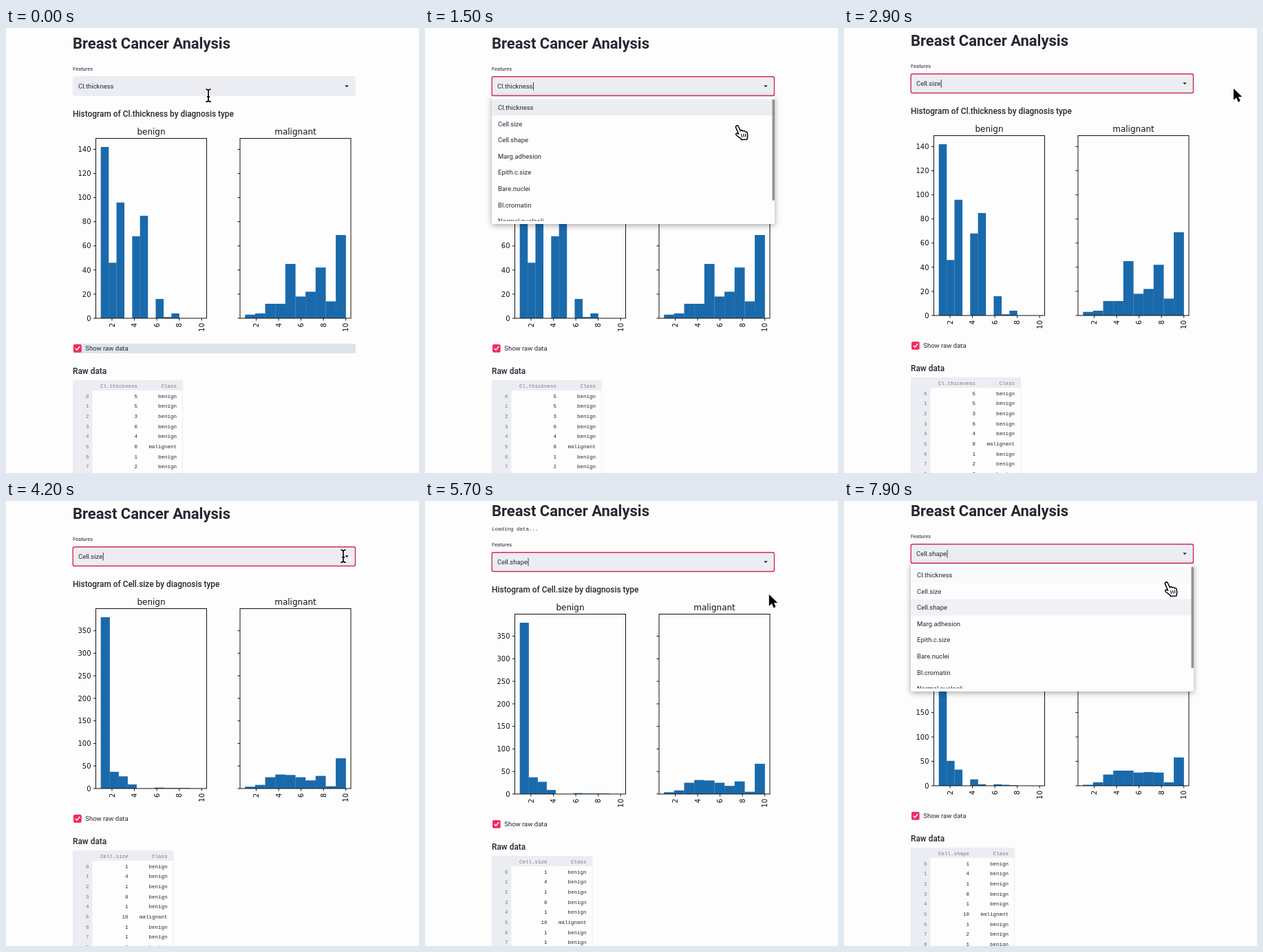
Animation of 600 by 647 pixels, one loop 8 s. Source, as an HTML page with a canvas:

```html
<!DOCTYPE html>
<html lang="en">
<head>
<meta charset="utf-8">
<title>Breast Cancer Analysis</title>
<style>
html, body { margin: 0; width: 100%; height: 100%; overflow: hidden; background: #fdfdfe; }
canvas { display: block; }
</style>
</head>
<body>
<canvas id="stage" width="600" height="647"></canvas>
<script>
const ctx = document.getElementById('stage').getContext('2d');
const LOOP = 8000, STEP = 100;
const INK = '#262730', PANEL = '#ecedf2', PAPER = '#fdfdfe', RED = '#d62a58', BLUE = '#1a6aab';
const UI = 'Roboto, sans-serif', MONO = '"Liberation Mono", monospace', PLOT = '"DejaVu Sans", sans-serif';

const options = ['Cl.thickness', 'Cell.size', 'Cell.shape', 'Marg.adhesion',
  'Epith.c.size', 'Bare.nuclei', 'Bl.cromatin', 'Normal.nucleoli'];

const features = [
  { rows: [5, 5, 3, 6, 4, 8, 1, 2, 2], tick: 20, maxX: 8,
    benign: [142, 46, 96, 0, 68, 85, 0, 16, 1, 4],
    malignant: [3, 4, 12, 12, 45, 18, 22, 42, 14, 69] },
  { rows: [1, 4, 1, 8, 1, 10, 1, 1, 1], tick: 50, maxX: 9,
    benign: [380, 37, 27, 9, 0, 0, 2, 1, 1, 1],
    malignant: [4, 8, 25, 31, 30, 25, 18, 28, 5, 67] },
  { rows: [1, 4, 1, 8, 1, 10, 1, 2, 1], tick: 50, maxX: 8,
    benign: [351, 51, 33, 0, 13, 3, 0, 3, 2, 1],
    malignant: [2, 7, 23, 31, 31, 27, 28, 27, 7, 58] }
];

// time, x, y, and the pointer shape used from then on
const pointer = [
  [0, 294, 98, 'beam'], [100, 286, 108, 'arrow'], [400, 84, 448, 'hand'], [600, 130, 430, 'arrow'],
  [900, 482, 125, 'beam'], [1000, 500, 87, 'beam'], [1200, 495, 92, 'hand'], [1500, 456, 142, 'hand'],
  [1900, 450, 141, 'arrow'], [2300, 437, 148, 'arrow'], [2700, 566, 88, 'arrow'], [3200, 566, 88, 'arrow'],
  [3400, 520, 72, 'beam'], [3600, 500, 72, 'beam'], [3900, 487, 78, 'beam'], [4100, 487, 78, 'beam'],
  [4200, 490, 80, 'beam'], [4500, 490, 80, 'hand'], [5000, 450, 148, 'hand'], [5200, 463, 166, 'hand'],
  [5400, 470, 165, 'arrow'], [5900, 516, 120, 'arrow'], [6200, 512, 96, 'hand'], [6400, 506, 85, 'hand'],
  [6600, 502, 78, 'hand'], [7200, 502, 78, 'hand'], [7400, 499, 78, 'hand'], [7900, 471, 118, 'hand']
];
const clicks = [[1000, 500, 87], [1800, 452, 140], [4300, 491, 77], [5100, 457, 161], [7300, 499, 77]];
const hovers = [[0, 0], [1200, 0], [1600, 1], [4500, 1], [4900, 2], [7400, 2], [7850, 0]];

const within = (t, ...spans) => spans.some(([a, b]) => t >= a && t < b);
const stage = (t, a, b) => (t >= a) + (t >= b);
const lastIndex = (list, t) => list.filter(k => k[0] <= t).length - 1;

function text(s, x, y, size, family = UI, { weight = 400, align = 'left', color = INK } = {}) {
  ctx.font = `${weight} ${size}px ${family}`;
  ctx.textAlign = align;
  ctx.fillStyle = color;
  ctx.fillText(s, x, y);
}

function box(x, y, w, h, color, r = 0) {
  ctx.fillStyle = color;
  ctx.beginPath();
  ctx.roundRect(x, y, w, h, r);
  ctx.fill();
}

function line(points, width = 1, color = INK) {
  ctx.strokeStyle = color;
  ctx.lineWidth = width;
  ctx.beginPath();
  points.forEach(([x, y]) => ctx.lineTo(x, y));
  ctx.stroke();
}

function plot(x, title, counts, maxX, top, tick, labelled) {
  const ink = '#111', base = 422, height = 261.5, unit = 16.28;
  const sy = height / (top * 1.05), bin = (maxX - 1) * unit / 10;
  text(title, x + 80.5, 155, 12, PLOT, { align: 'center', color: ink });
  counts.forEach((n, i) => n && box(x + 7.2 + i * bin, base - n * sy, bin + .15, n * sy, BLUE));
  ctx.strokeStyle = ink;
  ctx.lineWidth = 1;
  ctx.strokeRect(x, base - height, 161, height);
  for (let v = 0; v <= top * 1.05; v += tick) {
    const y = base - v * sy;
    line([[x - 3.5, y], [x, y]], 1, ink);
    if (labelled) text(v, x - 7, y + 3.7, 10, PLOT, { align: 'right', color: ink });
  }
  for (let v = 2; v <= 10; v += 2) {
    const tx = x + 7.2 + (v - 1) * unit;
    line([[tx, base], [tx, base + 3.5]], 1, ink);
    ctx.save();
    ctx.translate(tx + 3.7, base + 7);
    ctx.rotate(-Math.PI / 2);
    text(v, 0, 0, 10, PLOT, { align: 'right', color: ink });
    ctx.restore();
  }
}

function table(index) {
  const name = options[index], right = 137 + 4.5 * name.length;
  const cell = (s, x, y, color) => text(s, x, y, 7.5, MONO, { align: 'right', color });
  box(97, 512, right - 31.5, 15, PANEL);
  box(97, 512, 28.5, 200, PANEL);
  line([[right + 65.5, 512], [right + 65.5, 712]], 1, '#eeeef2');
  cell(name, right, 522.7, '#777983');
  cell('Class', right + 57, 522.7, '#777983');
  features[index].rows.forEach((v, i) => {
    const y = 537.5 + 14.7 * i;
    cell(i, 120.5, y, '#777983');
    cell(v, right, y);
    cell(i === 5 ? 'malignant' : 'benign', right + 57, y);
  });
}

function select(value, focused, caret) {
  box(97, 70, 411, 29, '#ecedf3', 3);
  if (focused) {
    ctx.strokeStyle = RED;
    ctx.lineWidth = 1.4;
    ctx.beginPath();
    ctx.roundRect(97.2, 70.7, 410.3, 27.8, 2.5);
    ctx.stroke();
  }
  text(value, 105, 88, 9.5);
  if (caret) {
    const x = 106 + ctx.measureText(value).width;
    line([[x, 79], [x, 90.5]], .9);
  }
  ctx.fillStyle = INK;
  ctx.fill(new Path2D('M492.3 83.3h5.4l-2.7 2.9z'));
}

function checkbox(focused) {
  if (focused) box(97, 459, 411, 14, '#dfe4eb', 2);
  box(98, 460, 11.7, 11.7, '#f02b5d', 2);
  line([[100.7, 465.8], [103, 468.2], [107.2, 463]], 1.5, '#fff');
  text('Show raw data', 115.3, 469, 9.5);
}

function dropdown(t) {
  ctx.save();
  ctx.shadowColor = 'rgba(0,0,0,.35)';
  ctx.shadowBlur = 9;
  ctx.shadowOffsetY = 2;
  box(97, 99.5, 411, 185.5, PAPER, 2);
  ctx.restore();
  ctx.save();
  ctx.beginPath();
  ctx.rect(97, 99, 411, 181.5);
  ctx.clip();
  const i = lastIndex(hovers, t), k = Math.min(1, (t - hovers[i][0]) / 200);
  [[hovers[Math.max(0, i - 1)][1], 1 - k], [hovers[i][1], k]].forEach(([row, alpha]) => {
    ctx.globalAlpha = alpha;
    box(97, 103.7 + 23.6 * row, 408, 23.6, PANEL);
  });
  ctx.globalAlpha = 1;
  options.forEach((s, n) => text(s, 106, 119 + 23.6 * n, 9.5));
  ctx.restore();
  box(504.5, 103.5, 3.5, 147.5, '#929295', 1.7);
}

function expandIcon() {
  line([[516.5, 147.2], [516.5, 144.5], [519.2, 144.5]], 1.1);
  line([[516.5, 144.5], [519, 147]], 1.1);
  line([[523.2, 148.6], [523.2, 151.3], [520.5, 151.3]], 1.1);
  line([[523.2, 151.3], [520.7, 148.8]], 1.1);
}

const arrowPath = new Path2D('M0 0V16.8L4 13.2 6.7 19.4 9.7 18.1 7.1 12.1H12.3Z');
const beamPath = new Path2D('M-3.6-8.8Q-.6-8.8 0-6.8Q.6-8.8 3.6-8.8M0-7V8M-3.6 9.2Q-.6 9.2 0 7.2Q.6 9.2 3.6 9.2M-2 1.8H2');
const handPath = new Path2D('M-4.6 2.4C-5-.3-1.4-1 -.6 1.2L2.4 7.6C3.2 6.4 5.3 6.6 5.9 8 7 7 8.8 7.4 9.2 8.8 10.4 8.2 11.9 8.9 12.1 10.3L12.7 14C13 16.5 12.1 17.6 12 20L4 20.6C3 18.2-.6 17-4 13.4-5 12.1-3.6 10.6-2 11.2L-.3 12.2Z');
const fingerPath = new Path2D('M3.6 12L4.6 17M6.5 11.8L7.4 16.6M9.3 11.5L10 16');

function drawPointer(x, y, shape) {
  ctx.save();
  ctx.translate(x, y);
  ctx.lineJoin = 'round';
  const stroke = (path, width, color) => {
    ctx.lineWidth = width;
    ctx.strokeStyle = color;
    ctx.stroke(path);
  };
  if (shape === 'beam') {
    stroke(beamPath, 3.6, '#fff');
    stroke(beamPath, 1.7, '#000');
  } else if (shape === 'arrow') {
    stroke(arrowPath, 2.4, '#fff');
    ctx.fillStyle = '#000';
    ctx.fill(arrowPath);
  } else {
    stroke(handPath, 3, '#fff');
    ctx.fillStyle = '#fff';
    ctx.fill(handPath);
    stroke(handPath, 1.5, '#000');
    stroke(fingerPath, 1.1, '#000');
  }
  ctx.restore();
}

function pointerAt(t) {
  const i = lastIndex(pointer, t), [t0, x0, y0, shape] = pointer[i];
  const [t1, x1, y1] = pointer[i + 1] || [LOOP, x0, y0];
  const u = (t - t0) / (t1 - t0), k = u * u * (3 - 2 * u);
  return [x0 + (x1 - x0) * k, y0 + (y1 - y0) * k, shape];
}

function drawRing(t) {
  for (const [start, x, y] of clicks) {
    const age = t - start;
    if (age < 0 || age >= 300) continue;
    ctx.globalAlpha = age < 200 ? 1 : .4;
    ctx.strokeStyle = '#111';
    ctx.lineWidth = 1.7;
    ctx.beginPath();
    ctx.arc(x, y, 36, 0, 2 * Math.PI);
    ctx.stroke();
    ctx.globalAlpha = 1;
  }
}

function draw(t) {
  const value = stage(t, 1900, 5300), shown = stage(t, 3200, 6300);
  const chart = features[stage(t, 3700, 6900)];
  const scroll = -4 * stage(t, 2000, 5400);
  const loading = within(t, [2000, 2700], [5400, 5900]);
  const open = within(t, [1200, 1900], [4500, 5300], [7400, LOOP]);
  const focused = t >= 1100;
  const [px, py, shape] = pointerAt(t);

  ctx.fillStyle = PAPER;
  ctx.fillRect(0, 0, 600, 647);
  ctx.save();
  ctx.translate(0, scroll);
  text('Breast Cancer Analysis', 97, 30, 22, UI, { weight: 700 });
  if (loading) {
    text('Loading data...', 97, 51, 7.5, MONO);
    ctx.translate(0, 12);
  }
  text('Features', 97, 62, 7.5);
  select(options[value], focused, focused && !within(t, [4800, 5300]));
  text(`Histogram of ${options[shown]} by diagnosis type`, 97, 129, 11.9, UI, { weight: 500 });
  const top = chart.benign[0];
  plot(130.5, 'benign', chart.benign, chart.maxX, top, chart.tick, true);
  plot(340, 'malignant', chart.malignant, 10, top, chart.tick, false);
  checkbox(!focused);
  text('Raw data', 97, 502.5, 11.9, UI, { weight: 500 });
  table(shown);
  if (!open && px > 97 && px < 508 && py > 138 && py < 445) expandIcon();
  if (open) dropdown(t);
  ctx.restore();
  drawRing(t);
  drawPointer(px, py, shape);
}

function tick() {
  draw(Math.floor(performance.now() % LOOP / STEP) * STEP);
  requestAnimationFrame(tick);
}
tick();
</script>
</body>
</html>
```
